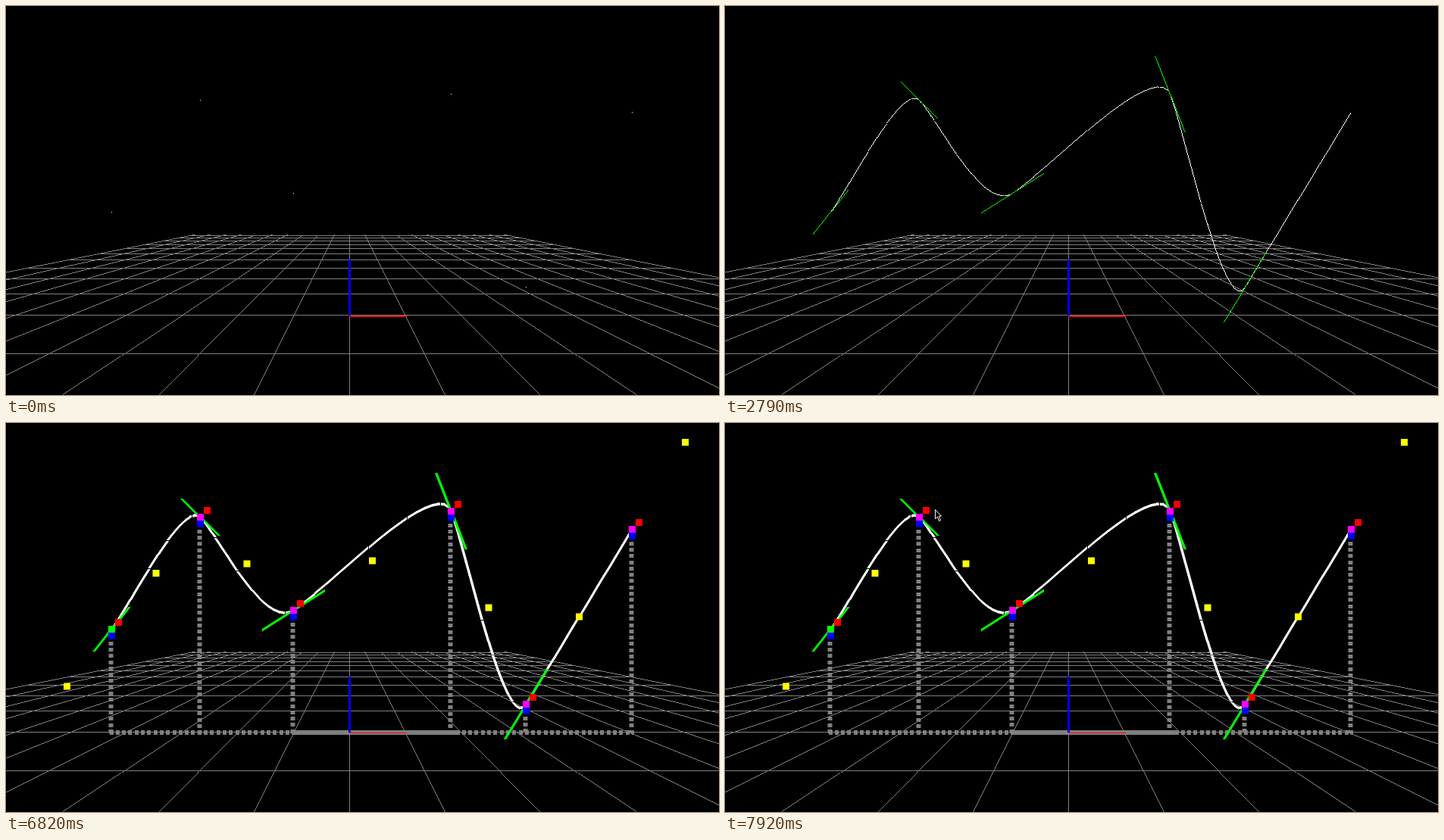
Recreate the animation shown at these times as an HTML page with a canvas. Size 941x514 px, loop 8000 ms.

```html
<!DOCTYPE html>
<html lang="en">
<head>
<meta charset="utf-8">
<title>Spline editor</title>
<style>
  html, body { margin: 0; width: 100%; height: 100%; overflow: hidden; background: #000; }
  canvas { display: block; }
</style>
</head>
<body>
<canvas id="stage" width="941" height="514"></canvas>
<script>
const W = 941, H = 514, LOOP = 8000;
const ctx = document.getElementById('stage').getContext('2d');
const GRAY = '#808080';

const knots = [[139.5, 272.5], [256.5, 124.5], [379.5, 247.5],
               [587.5, 116.5], [686.5, 371.5], [826.5, 140.5]];
const rows = [303, 306, 310, 315, 320, 327, 335, 346, 360, 380, 408, 459];
const CENTER = 453.5, FLOOR = 409, TENSION = 0.58, STEPS = 20;

// One step per pixel along the longer axis; hairlines snap to whole pixels.
function line(x0, y0, x1, y1, color, w = 1) {
  ctx.fillStyle = color;
  const dx = x1 - x0, dy = y1 - y0;
  const n = Math.max(1, Math.round(Math.max(Math.abs(dx), Math.abs(dy))));
  const flat = Math.abs(dx) >= Math.abs(dy);
  const edge = c => w === 1 ? Math.floor(c) : c - w / 2;
  for (let i = 0; i <= n; i++) {
    const x = x0 + dx * i / n, y = y0 + dy * i / n;
    if (x < -w || x > W + w || y < -w || y > H + w) continue;
    if (flat) ctx.fillRect(Math.floor(x), edge(y), 1, w);
    else ctx.fillRect(edge(x), Math.floor(y), w, 1);
  }
}

function square(x, y, size, color) {
  ctx.fillStyle = color;
  ctx.fillRect(x - size / 2, y - size / 2, size, size);
}

function dashes(x0, y0, x1, y1, w) {
  const len = Math.hypot(x1 - x0, y1 - y0);
  const ux = (x1 - x0) / len, uy = (y1 - y0) / len;
  for (let d = 0; d < len; d += 8.3) {
    const e = Math.min(len, d + 4);
    line(x0 + ux * d, y0 + uy * d, x0 + ux * e, y0 + uy * e, GRAY, w);
  }
}

// Half of the floor's width at screen height y.
const halfWidth = y => 4.99 * (y - 261.1);

function drawGrid() {
  for (const y of rows) {
    const half = halfWidth(y + 0.5);
    line(Math.max(0, CENTER - half), y, Math.min(W, CENTER + half), y, GRAY);
  }
  for (let n = -10; n <= 10; n++) {
    const top = [2, 3, 6].includes(Math.abs(n)) ? 304 : 302;
    const x = y => CENTER + n / 10 * halfWidth(y);
    line(x(top), top, x(H), H, GRAY);
  }
}

function drawDrops(w) {
  for (const [x, y] of knots) dashes(x - 1, y, x - 1, FLOOR, w);
  dashes(137, FLOOR, 378, FLOOR, w);
  line(378, FLOOR, 594, FLOOR, GRAY, w);
  dashes(594, FLOOR, 828, FLOOR, w);
}

function chord(i) {
  const a = knots[Math.min(i, 4)], b = knots[Math.min(i, 4) + 1];
  return [b[0] - a[0], b[1] - a[1]];
}

function splineAt(i, t) {
  const m0 = chord(i), m1 = chord(i + 1), s = 1 - t;
  return [0, 1].map(k =>
    knots[i][k] * (1 + 2 * t) * s * s + knots[i + 1][k] * t * t * (3 - 2 * t) +
    TENSION * (m0[k] * t * s * s - m1[k] * t * t * s));
}

function drawSpline(w, closed) {
  const gap = closed ? 0 : 0.01;
  for (let i = 0; i < 5; i++) {
    let p = splineAt(i, gap);
    for (let j = 1; j <= STEPS; j++) {
      const q = splineAt(i, Math.min(j / STEPS, 1 - gap));
      line(...p, ...q, '#fff', w);
      p = q;
    }
  }
  for (let i = 0; i < 5; i++) {
    const [x, y] = knots[i], [dx, dy] = chord(i).map(v => v * 0.198);
    line(x - dx, y - dy, x + dx, y + dy, '#0f0', w);
  }
}

function drawHandles(size) {
  const mid = (a, b) => square((a[0] + b[0]) / 2, (a[1] + b[1]) / 2, size, '#ff0');
  for (let i = 0; i < 5; i++) mid(knots[i], knots[i + 1]);
  square(80.5, 348, size, '#ff0');
  square(896.5, 25.5, size, '#ff0');
  knots.forEach(([x, y], i) => {
    square(x + 9, y - 9, size, '#f00');
    square(x, y + 8.5, size, '#00f');
    square(x, y, size, i ? '#f0f' : '#0f0');
  });
}

function drawCursor(x, y) {
  const shape = [[0, 0], [0, 12], [3, 9.5], [5, 15], [7, 14], [5, 8.5], [8, 8.5]];
  ctx.beginPath();
  for (const [dx, dy] of shape) ctx.lineTo(x + dx + 0.5, y + dy + 0.5);
  ctx.closePath();
  ctx.fillStyle = '#000';
  ctx.fill();
  ctx.strokeStyle = '#fff';
  ctx.lineWidth = 1;
  ctx.stroke();
}

function draw(t) {
  ctx.fillStyle = '#000';
  ctx.fillRect(0, 0, W, H);
  const thin = t >= 1220 && t < 2790, thick = t >= 6820;
  const handles = thin || thick;
  drawGrid();
  if (handles) drawDrops(thick ? 6 : 4);
  // The drop lines cover all but a sliver of the red axis.
  line(453, handles ? 409 : 410, 528, handles ? 409 : 410, '#f00', handles ? 1 : 2);
  line(CENTER, 335, CENTER, 408, '#00f', 3);
  if (t < 1220) for (const [x, y] of knots) square(x, y, 1, '#fff');
  if (t >= 2790) drawSpline(t < 4500 ? 1 : 3.5, t >= 5970);
  if (handles) drawHandles(thick ? 9 : 6);
  if (t >= 7460) {
    const step = Math.min(6, Math.floor((t - 7460) / 76.6));
    const k = 1 - (1 - step / 6) ** 2;
    drawCursor(Math.round(17 + 260 * k), Math.round(87 + 27 * k));
  }
}

const start = performance.now();
function tick() {
  draw((performance.now() - start) % LOOP);
  requestAnimationFrame(tick);
}
tick();
</script>
</body>
</html>
```
